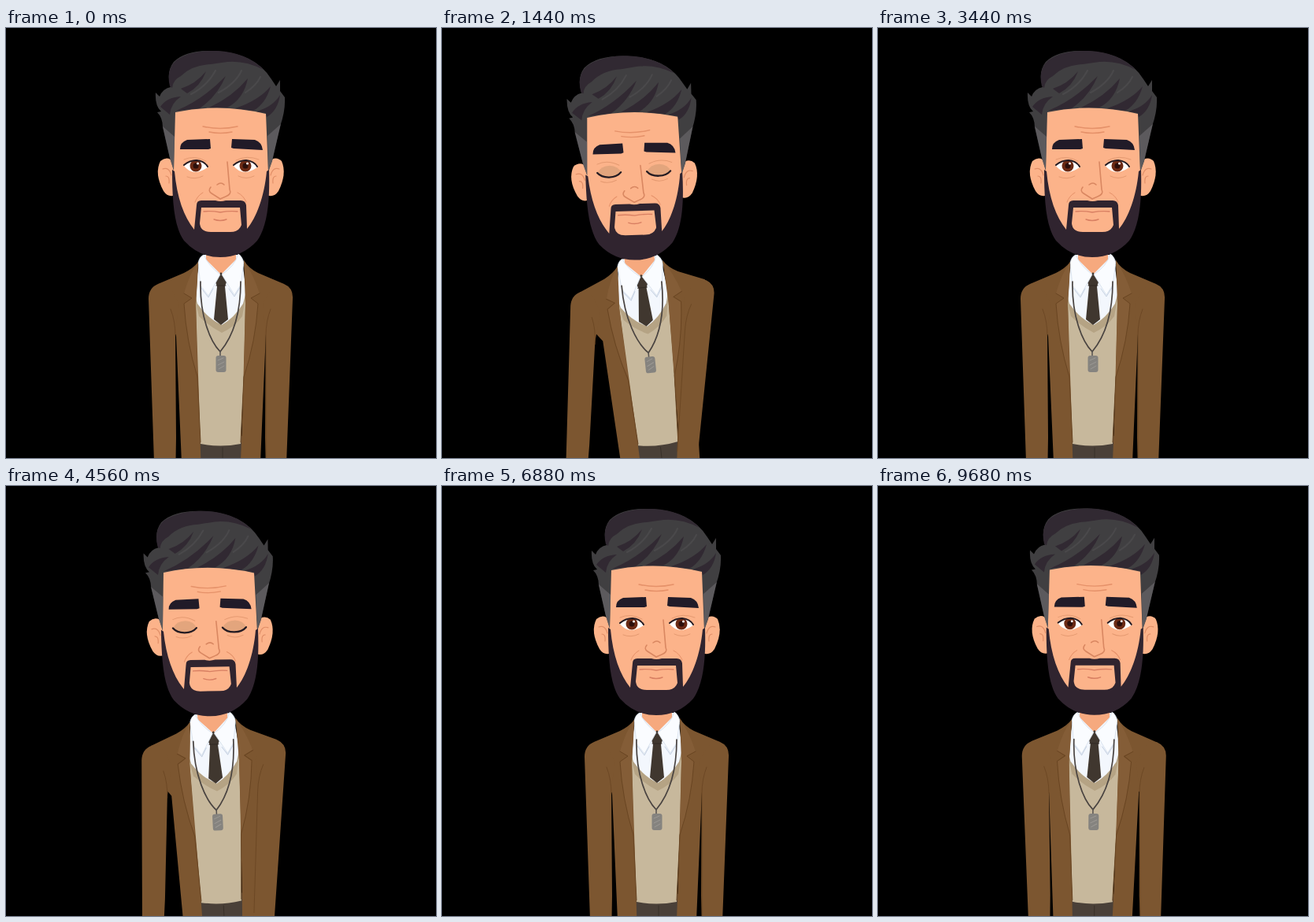
Animation of 546x546 px, one loop 9760 ms. Source, as an HTML page:

```html
<!DOCTYPE html>
<html lang="en">
<head>
<meta charset="utf-8">
<title>Dozing man</title>
<style>
html, body { margin: 0; width: 100%; height: 100%; overflow: hidden; background: #000; }
svg { display: block; width: 100vw; height: 100vh; }
.line { fill: none; stroke-linecap: round; stroke-linejoin: round; }
</style>
</head>
<body>
<svg viewBox="0 0 546 546">
  <rect width="546" height="546" fill="#000"/>
  <g id="torso">
    <path fill="#4a4038" d="M245 518H300V575H245Z"/>
    <path class="line" stroke="#393029" d="M275 533V570"/>
    <path fill="#c7b89c" d="M238 335H306L302 440 298 528Q272 533 247 528Z"/>
    <path fill="#b5a384" d="M239 340L245 366Q258 379 274 387 291 379 300 366L305 338Z"/>
    <path fill="#f3f7fd" d="M246 295L251 288H297L300 295 305 335 301 350Q290 368 274 377 256 369 243 350L239 335Z"/>
    <path fill="#f6a97e" d="M254 270H292V294L273 313 254 294Z"/>
    <path fill="#40372f" d="M273 310L281 320 278 328 282 370 273 377 264 370 268 328 265 320Z"/>
    <path class="line" stroke="#302923" d="M267 327H279"/>
    <path fill="#fafcff" stroke="#d5dfeb" stroke-width=".8" d="M251 288Q246 290 244 298L247 327 257 340 272 313Q257 302 251 288ZM295 287Q300 290 302 298L298 326 290 339 274 313Q290 303 295 287Z"/>
    <path class="line" stroke="#c7d2e2" d="M247 329L257 342 263 331M298 328L290 341 283 331"/>
    <path class="line" stroke="#494340" stroke-width="1.7" d="M247 322C246 365 259 398 272 411Q298 380 298 322"/>
    <path class="line" stroke="#55514f" stroke-width="1.5" d="M272 410V418"/>
    <rect x="266.500" y="416" width="13" height="21" rx="3" fill="#85837f"/>
    <path class="line" stroke="#9c9994" d="M269 422L276 419M269 428L277 424M270 433L277 429"/>

    <path fill="#7c5630" d="M244 297Q238 305 226 311L193 325 197 365 216 390 224 575H248L246 500 241 350Z"/>
    <path fill="#7c5630" d="M302 295Q308 305 320 311L353 325 349 365 330 388 322 575H297L300 500 304 350Z"/>
    <path fill="#845d37" d="M244 297Q233 312 226 337L236 343 226 350Q229 398 243 443L241 350 243 322Z"/>
    <path fill="#845d37" d="M302 295Q314 313 322 337L311 343 320 350Q317 398 302 443L304 350 304 322Z"/>
    <path class="line" stroke="#694522" d="M226 337L236 343 226 350Q229 398 243 443L247 526M322 337L311 343 320 350Q317 398 302 443L298 526"/>
    <g id="armL">
      <path fill="#7c5630" d="M212 335L203 324 193 325Q181 330 181 344L189 580H215L216 520 215 388 219 350Z"/>
      <path class="line" stroke="#694522" stroke-width=".8" d="M209 357Q215 372 215 391"/>
    </g>
    <g id="armR">
      <path fill="#7c5630" d="M334 336L344 324 353 325Q365 330 364 344L355 580H331L329 520 330 388 326 350Z"/>
      <path class="line" stroke="#694522" stroke-width=".8" d="M336 357Q330 372 330 391L330 546"/>
    </g>

    <g id="head">
      <g fill="#fcb38a">
        <path d="M214 171Q205 161 196 169 188 185 200 207 206 216 215 212Z"/>
        <path d="M332 171Q342 161 350 169 357 185 346 207 340 216 331 212Z"/>
        <path d="M212 96H333V194C333 247 314 281 274 281 231 281 212 246 212 194Z"/>
      </g>
      <path class="line" stroke="#e18f68" stroke-width="1.2" d="M199 179Q207 176 210 187M203 188Q208 188 207 197M347 179Q339 176 336 187M343 188Q338 188 339 197"/>
      <path fill="#403f41" d="M213 181L208 165 199 126Q199 114 192 107L197 106Q189 99 190 82L195 87Q199 77 209 75 203 56 213 43 228 28 263 29 316 31 337 65L343 74 348 66 348 80 354 88Q355 105 348 125L338 169 333 183 330 109Q272 95 215 107Z"/>
      <path fill="#68666a" opacity=".7" d="M199 125L214 138 213 181 208 165ZM349 122L332 137 333 183 338 168Z"/>
      <g fill="#312932">
        <path d="M208 74Q203 53 216 41 235 28 268 29 306 31 327 53 304 41 281 43L260 46Q236 47 222 61 212 66 211 76Z"/>
        <path d="M216 105Q250 91 279 61 268 87 246 102Z"/>
        <path d="M258 101Q288 87 307 64 302 90 281 101Z"/>
        <path d="M291 102Q321 92 336 74 330 96 314 105Z"/>
        <path d="M318 106Q339 100 348 85 345 105 331 113L330 108Z"/>
        <path d="M222 77Q241 71 254 55 247 74 230 83Z"/>
        <path d="M196 100Q204 88 222 87 209 96 208 110Z"/>
      </g>
      <path class="line" stroke="#4a494b" stroke-width="2" d="M235 84Q256 73 266 54M270 82Q292 70 299 54M304 82Q318 73 323 62"/>
      <path class="line" stroke="#e59169" stroke-width="1.4" d="M250 125Q272 130 294 125M258 132Q272 135 287 132"/>
      <path fill="#211b28" d="M221 154Q221 145 230 142L259 141 260 153 257 154ZM287 141L316 142Q325 145 326 155L289 153 286 152Z"/>
      <path class="line" stroke="#e59a71" d="M226 167Q239 161 254 169M292 168Q306 161 321 167M230 189Q240 193 250 188M295 188Q305 193 315 188"/>
      <g id="eyes"></g>
      <path class="line" stroke="#d98761" stroke-width="1.6" d="M281 170L284 205Q287 211 279 214L272 217 261 210Q256 207 260 202M268 199Q273 195 277 199"/>
      <path class="line" stroke="#e59169" d="M250 209Q243 213 240 221M294 209Q302 213 305 221"/>
      <path fill="#30242f" fill-rule="evenodd" d="M211 180C211 218 213 252 226 270Q245 291 272 291 300 291 319 270C333 250 335 216 334 180L331 182C328 214 318 241 306 255L305 225Q304 219 298 219L279 219Q272 221 266 219L248 219Q242 219 242 225L239 256C226 240 217 215 214 182ZM248 228H297L299 250Q296 259 285 259H260Q247 259 246 248Z"/>
      <path class="line" stroke="#d87f62" stroke-width="1.4" d="M251 233Q261 232 272 234 284 232 294 233M264 243Q272 246 280 243"/>
    </g>
  </g>
</svg>
<script>
const LOOP = 9760, CYCLE = 3800;
const $ = id => document.getElementById(id);

const eye = x => `<g transform="translate(${x} 176)">
  <g class="open">
    <path fill="#fff" d="M-15 -1Q-8 -8 1 -8 11 -7 15 1 6 7 -1 7 -10 6 -15 -1Z"/>
    <circle cy="-1" r="7.500" fill="#6b2a14"/><circle cy="-1" r="3.500" fill="#2b0f0b"/>
    <circle cx="2.500" cy="-4" r="1.500" fill="#fff"/>
    <path class="line" stroke="#241b22" stroke-width="2" d="M-15 -2Q-8 -8 1 -8 11 -7 15 0"/>
  </g>
  <g class="shut">
    <path fill="#e3a57d" d="M-15 2Q-10 -7 1 -7 12 -6 15 2 9 8 0 8 -10 8 -15 2Z"/>
    <path class="line" stroke="#241b22" stroke-width="2.300" d="M-15 2Q-10 8 0 8 10 8 15 2"/>
    <path class="line upper" stroke="#241b22" stroke-width="2" d="M-15 2Q-11 -5 1 -5 12 -5 15 2"/>
  </g></g>`;
$('eyes').innerHTML = eye(241) + eye(304);

const show = (sel, on) => document.querySelectorAll(sel)
  .forEach(e => e.setAttribute('visibility', on ? 'visible' : 'hidden'));

// [phase ms, lean]: slow nod to the left, then a jerk awake
const keys = [[0, 0], [200, 0], [400, 5], [760, 15.5], [960, 20.5], [1440, 32],
  [1760, 46], [1840, 30], [1920, -13], [2000, -8], [2080, -3], [2160, 0], [CYCLE, 0]];

function leanAt(p) {
  const i = keys.findIndex(k => k[0] > p);
  const [t0, a] = keys[i - 1], [t1, b] = keys[i];
  return a + (b - a) * (p - t0) / (t1 - t0);
}

function draw(t) {
  const p = t % CYCLE, lean = leanAt(p);
  const set = (id, v) => $(id).setAttribute('transform', v);
  set('torso', `rotate(${-0.185 * lean} 272 508) translate(0 508) scale(1 ${1 - 0.0003 * lean}) translate(0 -508)`);
  set('armL', `rotate(${0.295 * lean} 198 335)`);
  set('armR', `rotate(${0.295 * lean} 348 335)`);
  set('head', `translate(${-0.1 * lean} 0) rotate(${0.135 * lean} 272 285)`);

  const shut = p >= 480 && p < 1840;
  const half = shut && (p < 560 || (p >= 920 && p < 1000) || p >= 1780);
  show('.open', !shut);
  show('.shut', shut);
  show('.upper', half);
}

const start = performance.now();
function tick() {
  const t = (performance.now() - start) % LOOP;
  draw(Math.floor(t / 80) * 80);
  requestAnimationFrame(tick);
}
draw(0);
requestAnimationFrame(tick);
</script>
</body>
</html>
```
